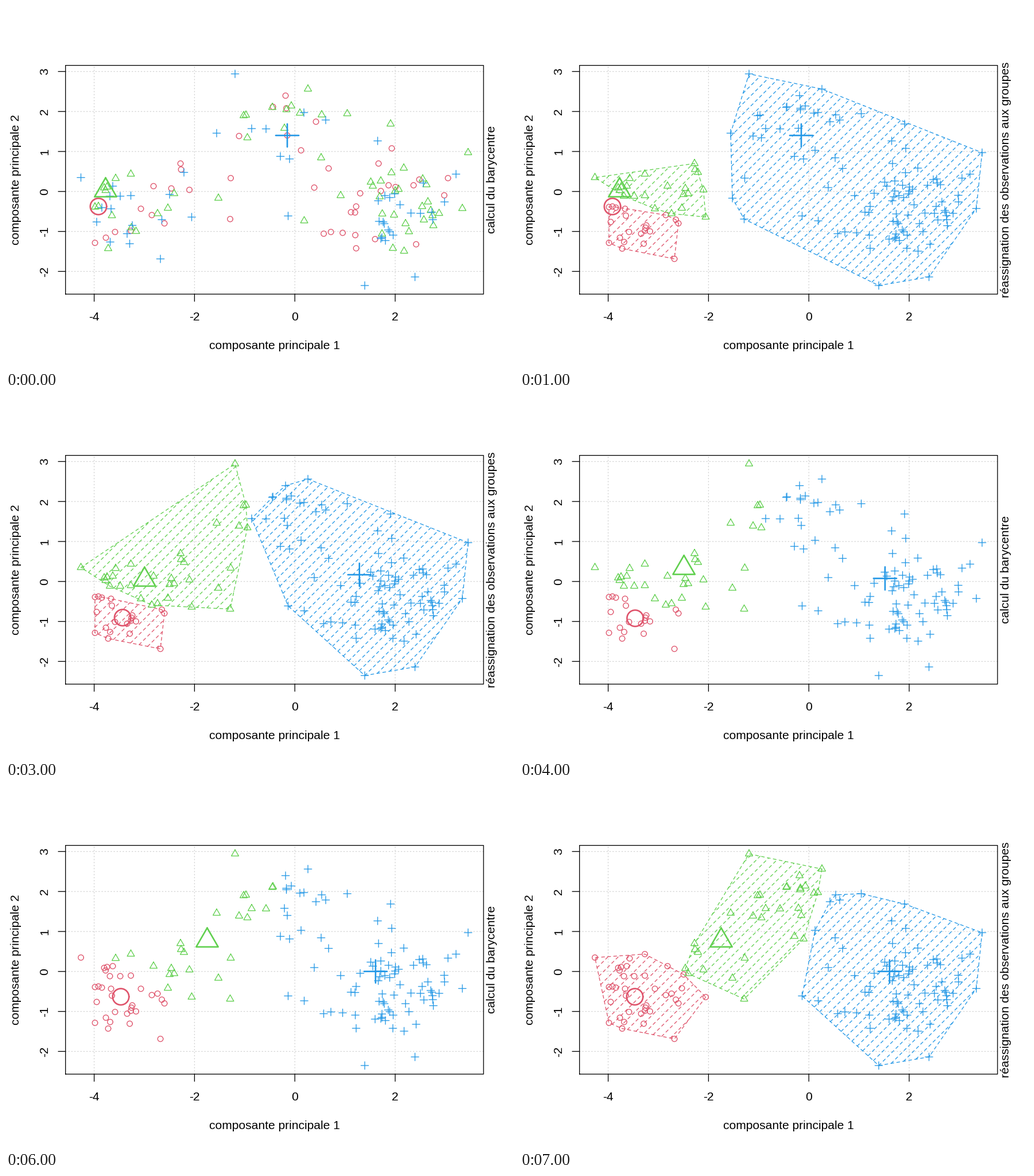
A matplotlib script for the animation above (8 s loop, 885x632 px).

```python
import numpy as np
import matplotlib.pyplot as plt
from matplotlib.animation import ArtistAnimation
from matplotlib.collections import LineCollection

# Stage geometry in pixels, y pointing down
W, H, DPI = 885, 632, 100
INCH = W / 7
LINE = 0.2 * INCH
LEFT, TOP = 4.1 * LINE, 4.1 * LINE
RIGHT, BOTTOM = W - 2.1 * LINE, H - 5.1 * LINE
ORIGIN = np.array([503.2, 323.8])
UNIT = np.array([87.4, 69.8])
PX = 72 / DPI
LWD = INCH / 96
FONT = INCH / 6

RED, GREEN, BLUE = COLORS = ["#DF536B", "#61D04F", "#2297E6"]
STEPS = 8

# Observations, one list per initial random group
circles = [
    (487, 156.5), (465, 176), (488.5, 178.5), (406, 227), (490, 226),
    (540, 202), (514, 252), (672, 248.5), (649, 275), (562, 283.5),
    (304, 275), (305, 285.5), (391.5, 300.5), (257, 314.5), (288, 318.5),
    (319.5, 321), (390.5, 372), (235, 354), (254, 365), (276, 379.5),
    (155, 413.5), (174, 404.5), (190, 394.5), (217.5, 392.5), (537, 317),
    (617, 327), (666.5, 313), (653, 323), (678.5, 316), (710, 313),
    (720, 303), (770, 300.5), (763.5, 330.5), (610, 350), (601, 360),
    (608, 360.5), (553.5, 397.5), (566, 394.5), (586.5, 396), (608.5, 400),
    (610, 423), (643, 407), (714.5, 416),
]
triangles = [
    (526, 145), (414, 191.5), (418, 190.5), (464, 177), (497, 174.5),
    (488.5, 181), (512, 187), (550, 190), (594.5, 188), (670, 206),
    (485, 213.5), (420.5, 230), (549, 265), (805, 256), (693, 283),
    (671.5, 291), (726, 302), (732.5, 312), (653, 305.5), (635.5, 307.5),
    (639, 314.5), (684, 320), (651, 333), (678, 323), (583, 331),
    (519.5, 375), (370, 335.5), (217.5, 293.5), (191, 301), (171, 317.5),
    (176, 316), (173.5, 322), (293, 327.5), (282, 353), (264, 362.5),
    (155, 351), (161, 350), (184.5, 366), (218.5, 387), (226.5, 393.5),
    (178, 423.5), (735, 342), (725, 350), (740, 357), (795, 353.5),
    (754.5, 362), (743, 366), (728, 373.5), (744.5, 383.5), (696, 380),
    (702, 394), (676, 365), (655.5, 363), (655, 398), (674, 423),
    (693.5, 428),
]
pluses = [
    (399, 118.5), (519, 186), (557, 199), (367, 222), (428, 214),
    (453, 214.5), (647.5, 235.5), (478, 262.5), (494, 267), (130.5, 299.5),
    (310, 290.5), (186, 314.5), (181, 332), (199, 332), (217.5, 331),
    (285, 329), (167, 352), (183, 354), (158, 377), (271.5, 373),
    (220, 383), (211, 397.5), (181.5, 412), (215.5, 415), (269, 441.5),
    (323.5, 368.5), (491.5, 366.5), (727, 309), (784, 293.5), (764, 342),
    (648.5, 340), (660, 331), (668.5, 334.5), (677, 328), (686.5, 347),
    (705.5, 361.5), (722, 362), (742, 360), (743.5, 373), (650, 376),
    (657, 377), (659, 380), (666, 391), (668.5, 394), (674.5, 400),
    (653, 406), (655, 404), (661, 409.5), (712.5, 473), (625, 488),
]
groups = [circles, triangles, pluses]
points = np.array(circles + triangles + pluses, float)
labels = np.repeat([0, 1, 2], [len(g) for g in groups])
centers = np.array([(161, 350), (173.5, 322), (490, 226)], float)


def assign(centers):
    gap = (points[:, None] - centers[None]) / UNIT
    return (gap ** 2).sum(axis=2).argmin(axis=1)


def barycentres(labels):
    return np.array([points[labels == k].mean(axis=0) for k in range(3)])


def glyph(kind, cex):
    """Polylines of a plotting symbol centred on (0, 0)."""
    r = 0.375 * FONT * cex
    if kind == 0:
        a = np.linspace(0, 2 * np.pi, 49)
        return [r * np.column_stack([np.cos(a), np.sin(a)])]
    if kind == 1:
        top, half, low = 1.5551 * r, 1.3468 * r, 0.7776 * r
        return [np.array([(0, -top), (half, low), (-half, low), (0, -top)])]
    arm = np.sqrt(2) * r
    return [np.array([(-arm, 0), (arm, 0)]), np.array([(0, -arm), (0, arm)])]


def hull(pts):
    """Convex hull, clockwise on screen, starting at the rightmost point."""
    pts = sorted(map(tuple, pts))

    def chain(seq):
        out = []
        for p in seq:
            while len(out) > 1:
                (ax_, ay), (bx, by) = out[-2:]
                if (bx - ax_) * (p[1] - ay) - (by - ay) * (p[0] - ax_) > 0:
                    break
                out.pop()
            out.append(p)
        return out[:-1]

    lower, upper = chain(pts), chain(pts[::-1])
    return np.array(upper + lower)


def hatch(poly):
    """Rising 45 degree lines, ten per inch, clipped to a convex polygon."""
    step = INCH / 10 * np.sqrt(2)
    base = ORIGIN.sum()
    ring = np.vstack([poly, poly[:1]])
    s = ring.sum(axis=1)
    first = int(np.ceil((s.min() - base) / step))
    last = int(np.floor((s.max() - base) / step))
    lines = []
    for k in range(first, last + 1):
        c = base + k * step
        cuts = []
        for p, q, sp, sq in zip(ring, ring[1:], s, s[1:]):
            if (sp <= c) != (sq <= c):
                cuts.append(p + (q - p) * (c - sp) / (sq - sp))
        if len(cuts) == 2:
            lines.append(np.array(sorted(cuts, key=lambda p: p[0])))
    return lines


fig = plt.figure(figsize=(W / DPI, H / DPI), dpi=DPI, facecolor="white")
ax = fig.add_axes([0, 0, 1, 1])
ax.set_xlim(0, W)
ax.set_ylim(H, 0)
ax.axis("off")


def strokes(lines, color, lwd=1, dash="solid", z=3):
    art = LineCollection(lines, colors=color, linewidths=lwd * LWD * PX,
                         linestyles=[dash], capstyle="round",
                         joinstyle="round", zorder=z)
    art.set_snap(False)
    return ax.add_collection(art, autolim=False)


def label(x, y, text, angle=0):
    return ax.text(x, y, text, rotation=angle, rotation_mode="anchor",
                   ha="center", va="baseline", family="Liberation Sans",
                   fontsize=FONT * PX, color="black")


def draw_frame():
    xs = [(v, ORIGIN[0] + v * UNIT[0]) for v in (-4, -2, 0, 2)]
    ys = [(v, ORIGIN[1] - v * UNIT[1]) for v in range(-2, 4)]
    tick = LINE / 2
    grid = [[(x, BOTTOM), (x, TOP)] for _, x in xs]
    grid += [[(LEFT, y), (RIGHT, y)] for _, y in ys]
    strokes(grid, "#D3D3D3", dash=(0, (1, 3)), z=1)
    box = [(LEFT, BOTTOM), (RIGHT, BOTTOM), (RIGHT, TOP), (LEFT, TOP),
           (LEFT, BOTTOM)]
    ticks = [[(x, BOTTOM), (x, BOTTOM + tick)] for _, x in xs]
    ticks += [[(LEFT, y), (LEFT - tick, y)] for _, y in ys]
    strokes([box] + ticks, "black", z=2)
    for v, x in xs:
        label(x, BOTTOM + 1.8 * LINE, str(v))
    for v, y in ys:
        label(LEFT - 1.2 * LINE, y, str(v), 90)
    label((LEFT + RIGHT) / 2, BOTTOM + 3.8 * LINE, "composante principale 1")
    label(LEFT - 3.2 * LINE, (TOP + BOTTOM) / 2, "composante principale 2", 90)


def draw_step(labels, centers, caption, with_hulls):
    arts = [label(RIGHT + 0.8 * LINE, (TOP + BOTTOM) / 2, caption, 90)]
    for k, color in enumerate(COLORS):
        members = points[labels == k]
        small = [g + p for p in members for g in glyph(k, 0.6)]
        big = [g + centers[k] for g in glyph(k, 1.8)]
        arts.append(strokes(small, color))
        arts.append(strokes(big, color, lwd=2, z=4))
        if with_hulls:
            poly = hull(members)
            border = np.vstack([poly, poly[:1]])
            arts.append(strokes([border] + hatch(poly), color,
                                dash=(0, (4, 4))))
    return arts


draw_frame()
frames = []
for step in range(STEPS):
    if step % 2:
        labels = assign(centers)
        caption = "réassignation des observations aux groupes"
    else:
        if step:
            centers = barycentres(labels)
        caption = "calcul du barycentre"
    frames.append(draw_step(labels, centers, caption, step % 2 == 1))

anim = ArtistAnimation(fig, frames, interval=1000, repeat=True,
                       repeat_delay=0, blit=False)
plt.show()
```
